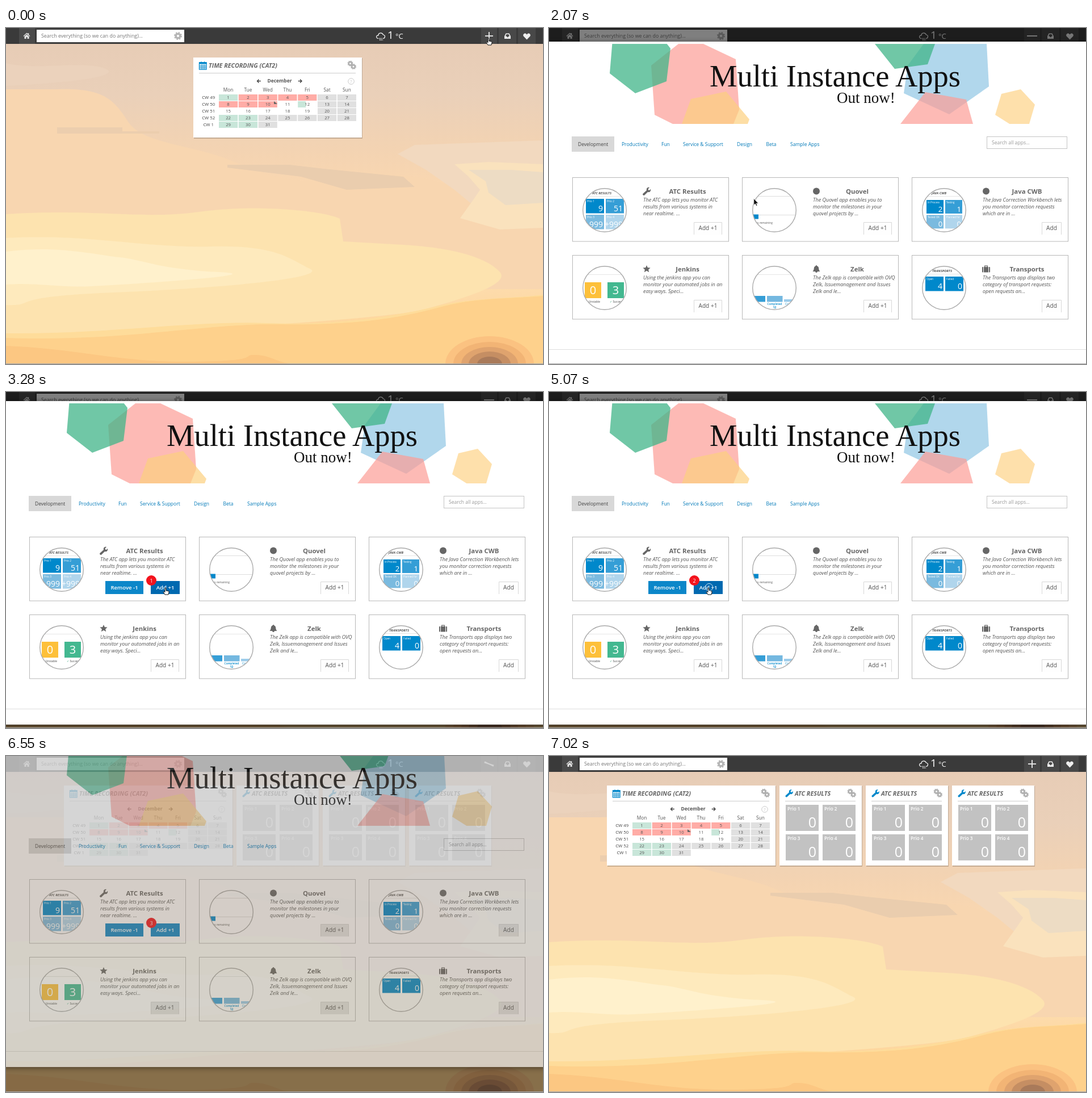
An HTML page for the animation above (8000 ms loop, 946 px wide and 592 px high).

```html
<!DOCTYPE html>
<html lang="en">
<head>
<meta charset="utf-8">
<title>App store</title>
<style>
html, body { margin: 0; width: 100%; height: 100%; overflow: hidden; background: #fbd9ae }
svg { display: block; width: 100%; height: 100%; font-family: "Open Sans", sans-serif }
.b { font-weight: 700 }
.s { font-weight: 600 }
.i { font-style: italic }
.m { text-anchor: middle }
.e { text-anchor: end }
.serif { font-family: "Liberation Serif", serif }
.btn { fill: #fefefe; stroke: #d8d8d8 }
.fading .btn { fill: #e6e6e6; stroke: #d4d4d4 }
</style>
</head>
<body>
<svg id="stage" viewBox="0 0 946 592" preserveAspectRatio="none"></svg>
<script>
const LOOP = 8000, BLUE = '#0088cb', GREY = '#666';
const $ = id => document.getElementById(id);

// Drawing helpers
const text = (x, y, size, str, fill = GREY, cls = '') =>
  `<text x="${x}" y="${y}" font-size="${size}" fill="${fill}" class="${cls}">${str}</text>`;
const rect = (x, y, w, h, fill, more = '') =>
  `<rect x="${x}" y="${y}" width="${w}" height="${h}" fill="${fill}" ${more}/>`;
const path = (d, fill, more = '') => `<path d="${d}" fill="${fill}" ${more}/>`;
const poly = (points, fill, opacity = 1) =>
  `<polygon points="${points}" fill="${fill}" opacity="${opacity}"/>`;
const line = (x1, x2, y, stroke = '#ccc') => path(`M${x1} ${y}H${x2}`, 'none', `stroke="${stroke}"`);
const circle = (x, y, r, fill, more = '') => `<circle cx="${x}" cy="${y}" r="${r}" fill="${fill}" ${more}/>`;
const group = (x, y, body, scale = 1) => `<g transform="translate(${x} ${y}) scale(${scale})">${body}</g>`;
const icon = (x, y, d, fill, scale = 1) => group(x, y, path(d, fill), scale);

const WRENCH = 'M-6.6 4.6 0-1.6C-1-5 2-7.4 5-6.4L2.6-4 3-2 5-1.6 7-3.8C8 .2 5 2.4 2 1.6L-4 7.2C-6 8-7.6 6.4-6.6 4.6Z';
const STAR = 'M0-6.6 1.9-2.2 6.6-1.9 3.1 1.2 4.2 5.8 0 3.3-4.2 5.8-3.1 1.2-6.6-1.9-1.9-2.2Z';
const BELL = 'M-6.5 4.5C-4 2-4.5-1-3.8-3-3-5-1.2-5.3-1-5.6A1 1 0 0 1 1-5.6C1.2-5.3 3-5 3.8-3 4.5-1 4 2 6.5 4.5H2A2 2 0 0 1-2 4.5Z';
const CASE = 'M-5-3.5V6H-6A1 1 0 0 1-7 5V-2.5A1 1 0 0 1-6-3.5ZM5-3.5H6A1 1 0 0 1 7-2.5V5A1 1 0 0 1 6 6H5ZM-4 6V-3.5H-3V-6H3V-3.5H4V6ZM-1.8-3.5H1.8V-4.8H-1.8Z';
const DOT = 'M-6 0A6 6 0 1 1 6 0A6 6 0 1 1-6 0Z';
const HEART = 'M0 6-5.8 0C-8-4-2.6-7.5 0-3 2.6-7.5 8-4 5.8 0Z';
const ARROW = 'M-3.5 0 0-3.5 1-2.5-.8-.7H3.8V.7H-.8L1 2.5 0 3.5Z';

const gear = (x, y, r, color) =>
  circle(x, y, r * .55, 'none', `stroke="${color}" stroke-width="${r * .5}"`) +
  circle(x, y, r * .86, 'none', `stroke="${color}" stroke-width="${r * .3}" stroke-dasharray="${r * .3377}"`);
const gears = (x, y) => gear(x - 2.5, y - 2.5, 5, '#b0b0b0') + gear(x + 3, y + 3, 5, '#b0b0b0');

function sky() {
  const stops = [[0, '#e6cbb5'], [.2, '#ead0b9'], [.36, '#f3d3b2'], [.5, '#fbd8b0'], [.75, '#fddcae'], [1, '#fed28f']];
  const mound = [[78, 49, '#fbc281'], [64, 39, '#f2b475'], [50, 30, '#dfa36e'], [37, 22, '#c58e63'], [22, 13, '#a97a5a']];
  return `<linearGradient id="sky" x2="0" y2="1">${stops.map(([o, c]) => `<stop offset="${o}" stop-color="${c}"/>`).join('')}</linearGradient>` +
    rect(0, 0, 946, 592, 'url(#sky)') +
    path('M0 108H90C170 105 190 125 215 165S330 205 400 235 520 280 640 262 830 310 946 330V460H0Z', '#f8d6b0') +
    path('M0 62C50 75 130 58 170 70S140 95 0 102Z', '#ebd2bc') +
    path('M90 175H205V182H270V186H90Z', '#ecceae') +
    path('M390 241H500L560 248 700 262 720 280 600 285 520 262 390 246Z', '#eacdae') +
    path('M690 222 720 206 946 198V350L830 318 790 285 740 250Z', '#f2d9bf') +
    path('M790 240 850 236 946 240V352L870 355 800 335 825 300 835 285 815 262Z', '#fae2bd') +
    path('M815 250H890L946 254V308L880 312 850 290 845 270Z', '#eddcc4') +
    path('M0 328C160 318 240 338 340 324S560 322 588 336L594 376 700 382C800 388 850 408 870 430S800 478 740 495 380 530 0 548Z', '#fde3af') +
    path('M0 370C150 362 240 388 360 385S500 408 535 424 390 458 190 466 60 490 0 488Z', '#feeabd') +
    path('M0 394C90 382 160 400 200 404S270 425 375 430 210 452 150 455 60 448 0 452Z', '#fff1cc') +
    path('M0 538C180 540 330 515 460 520S700 505 760 490 880 478 946 470V592H0Z', '#fedc9a') +
    path('M0 546C210 553 350 520 480 522S690 512 760 493 880 478 946 472V592H0Z', '#fed18c') +
    path('M0 560C130 565 200 590 330 588S410 575 440 576 480 592 510 592H0Z', '#fcc782') +
    mound.map(([rx, ry, c]) => `<ellipse cx="852" cy="592" rx="${rx}" ry="${ry}" fill="${c}"/>`).join('');
}

function header() {
  const bar = id => rect(-7, -.9, 14, 1.8, '#eee', `id="${id}"`);
  return rect(0, 0, 946, 28, '#3a3a3a') + rect(23, 0, 28, 28, '#4a4a4a') +
    path('M30.5 14 36.5 8.5 38.5 10.3V9H40.2V12L42.5 14 41.7 15 36.5 10.3 31.4 15ZM32.5 15 36.5 11.5 40.6 15V19H37.6V16H35.5V19H32.5Z', '#e4e4e4') +
    rect(54, 3, 260, 22, '#fff') + text(62, 17, 8.8, 'Search everything (so we can do anything)...', '#777') +
    gear(303, 14, 7, '#b5b5b5') +
    path('M656 18.5C651 18 652 12.5 656 13 656 8 663 7.5 664.5 12 669 12.5 668 18.5 664 18.5', 'none', 'stroke="#fff" stroke-width="1.2"') +
    path('M657 18.5H663M658 21H664', 'none', 'stroke="#fff" stroke-width="1.4" stroke-dasharray="1.4 1.2"') +
    text(672, 19, 19, '1', '#fff') + text(686, 19, 13, '°C', '#fff') +
    rect(837, 0, 28, 28, '#484848') + rect(868, 0, 31, 28, '#484848') + rect(902, 0, 31, 28, '#484848') +
    group(851, 14, bar('barA') + bar('barB')) +
    path('M880.5 9.5H886.5L889 14.5V19H878V14.5ZM881.5 11 880 14.5H882L883 16.3H884.5L885.3 14.5H887L885.5 11Z', '#eee', 'fill-rule="evenodd"') +
    icon(917.5, 14.5, HEART, '#eee');
}

const panel = w => rect(1, 53, w, 142, '#000', 'opacity=".18"') + rect(0, 52, w, 141, '#fff') +
  gears(w - 18, 65) + line(10, w - 11, 79.5);

function calendar() {
  const tones = { g: '#c8e6d9', r: '#ffaca6', y: '#e0e0e0' };
  const rows = ['grrrryy', 'rrrwwyy', 'wwwwwyy', 'ggyyyyy', 'ggy'];
  const weeks = [49, 50, 51, 52, 1];
  const col = i => 45 + i * 34.8;
  const days = rows.map((row, r) => text(26.7, 125 + r * 12, 7.8, 'CW ' + weeks[r], '#444', 'm') +
    [...row].map((k, c) => (tones[k] ? rect(col(c), 117 + r * 12, 33.2, 11, tones[k]) : '') +
      (r === 1 && c === 4 ? rect(col(c), 129, 14, 11, tones.g) : '') +
      text(col(c) + 16.6, 125 + r * 12, 7.8, r * 7 + c + 1, '#555', 'm')).join('')).join('');
  return panel(297) +
    rect(10.5, 61, 12.5, 12, '#fff', `stroke="${BLUE}" stroke-width="1.3"`) + rect(10, 60, 13.5, 3.5, BLUE) +
    path('M14 59V62M19.5 59V62M14 64V73M17 64V73M20 64V73M10 67H23M10 70H23', 'none', `stroke="${BLUE}"`) +
    text(27, 70, 10.75, 'TIME RECORDING (CAT2)', GREY, 'b i') +
    icon(115, 93.5, ARROW, '#444') + text(152, 96, 8.45, 'December', '#555', 'b m') + icon(188.5, 93.5, ARROW, '#444', '-1 1') +
    circle(278, 94, 5.3, 'none', 'stroke="#ccc"') + text(278, 97, 8, '?', '#c4c4c4', 'm') +
    ['Mon', 'Tue', 'Wed', 'Thu', 'Fri', 'Sat', 'Sun'].map((d, i) => text(col(i) + 16.6, 112, 8.3, d, '#555', 'm')).join('') +
    days + path('M142 129 148 134H142Z', '#666');
}

const results = x => group(x, 0, panel(145) + icon(17, 65.5, WRENCH, BLUE, .95) +
  text(27, 70, 10.75, 'ATC RESULTS', GREY, 'b i') +
  [0, 1, 2, 3].map(i => group(11 + i % 2 * 65, 86 + (i >> 1) * 52, rect(0, 0, 58, 46, '#c2c2c2') +
    text(3, 9.5, 8.1, 'Prio ' + (i + 1), '#fff', 's') + text(54, 40, 25, 0, '#fff', 'e'))).join(''));

// Miniatures inside the round previews
const TONES = [BLUE, '#359ed6', '#7abadf', '#b0d5ec'];
const tiles = (x, y, list, scale = 1, tones = TONES) => group(x, y, list.map(([label, n], i) =>
  group(i % 2 * 35, (i >> 1) * 28, rect(0, 0, 32, 25.5, tones[i]) +
    text(2, 6, 4.8, label, '#fff') + text(30, 22, 14, n, '#fff', 'e'))).join(''), scale);
const mini = (x, str) => text(x, 29, 5.8, str, '#555', 'b i e') + line(18, 96, 32.5, '#e6e6e6');

const APPS = [
  { name: 'ATC Results', icon: WRENCH, lines: ['The ATC app lets you monitor ATC', 'results from various systems in', 'near realtime. ...'],
    art: mini(69, 'ATC RESULTS') + tiles(24, 37, [['Prio 1', 9], ['Prio 2', 51], ['Prio 3', '999'], ['Prio 4', '+999']]) },
  { name: 'Quovel', icon: DOT, lines: ['The Quovel app enables you to', 'monitor the milestones in your', 'quovel projects by ...'],
    art: line(18, 96, 32.5, '#ddd') + line(18, 96, 65.5, '#ddd') + rect(18, 64.5, 11, 8, BLUE) + text(54, 81, 4.9, 'days remaining', '#555', 'e') },
  { name: 'Java CWB', icon: DOT, single: true, lines: ['The Java Correction Workbench lets', 'you monitor correction requests', 'which are in ...'],
    art: mini(61, 'JAVA CWB') + tiles(26, 39, [['In Process', 2], ['Testing', 1], ['Tested OK', 0], ['Planned for', 0]], .94) },
  { name: 'Jenkins', icon: STAR, lines: ['Using the jenkins app you can', 'monitor your automated jobs in an', 'easy ways. Speci...'],
    art: line(18, 96, 33.5, '#e6e6e6') + rect(22, 47, 29, 28, '#fdc03a') + rect(62, 47, 29, 28, '#43b890') +
      text(36.5, 68, 20, 0, '#fff', 'm') + text(76.5, 68, 20, 3, '#fff', 'm') +
      text(49, 83, 4.9, 'Unstable', '#444', 'e') + text(66, 83, 4.9, '<tspan fill="#2a9d70">✓</tspan> Success', '#444') },
  { name: 'Zelk', icon: BELL, lines: ['The Zelk app is compatible with OVQ', 'Zelk, Issuemanagement and Issues', 'Zelk and le...'],
    art: line(18, 96, 33.5, '#e6e6e6') + rect(18, 71, 23, 10.5, TONES[1]) + rect(44, 71, 27.5, 10.5, '#74b8e0') + rect(74, 77, 20, 4.5, '#9cccea') +
      text(57.5, 86.5, 4.9, 'Completed', BLUE, 's m') + text(57.5, 93, 4.9, 12, BLUE, 'b m') + text(76, 86.5, 4.9, 'Confirmed', BLUE) },
  { name: 'Transports', icon: CASE, single: true, lines: ['The Transports app displays two', 'category of transport requests:', 'open requests an...'],
    art: mini(71, 'TRANSPORTS') + tiles(24, 37, [['Open', 4], ['Failed', 0]], 1, [BLUE, BLUE]) }
];

function card(app, i) {
  const w = app.single ? 35 : 50, x = 264 - w;
  return group(41 + i % 3 * 299, i < 3 ? 256 : 393,
    rect(.5, -.5, 275, 112.5, 'none', 'stroke="#b8b8b8"') +
    `<g clip-path="url(#lens)">${app.art}</g>` + circle(57, 57, 38.3, 'none', 'stroke="#aaa" stroke-width="1.4"') +
    icon(131, 23.5, app.icon, GREY) + text(203, 28, 11.4, app.name, GREY, 'b m') +
    app.lines.map((l, k) => text(125, 42 + k * 12, 9, l, '#555', 'i')).join('') +
    `<path class="btn" d="M${x + .5} 100V78.5H${x + w - .5}V100"/>` +
    text(x + w / 2, 92, 10.1, app.single ? 'Add' : 'Add +1', '#555', 'm') +
    (i ? '' : `<g id="added">${rect(134, 77, 67, 23, '#0c87c9')}${text(167.5, 92, 9.6, 'Remove -1', '#fff', 's m')}` +
      rect(214, 77, 51, 23, '#0c87c9', 'id="add"') + text(239.5, 92, 9.6, 'Add +1', '#fff', 's m') +
      circle(215, 76, 9, '#f3131d') + '<text id="count" x="215" y="79.5" font-size="9" fill="#fff" class="m"></text></g>'));
}

function modal() {
  const tabs = [[51, 'Development'], [128, 'Productivity'], [198, 'Fun'], [236, 'Service &amp; Support'], [331, 'Design'], [382.5, 'Beta'], [425, 'Sample Apps']];
  return rect(-10, 16, 966, 570, '#fff', 'style="filter:drop-shadow(0 2px 5px rgba(0,0,0,.65))"') +
    '<g clip-path="url(#banner)">' +
    poly('228,20 272,20 329,47 335,136 325,161 218,161 186,145 180,58', '#fc9d96', .7) +
    poly('250,117 312,104 353,153 350,161 234,161', '#fdd07f', .7) +
    poly('112,12 107,72 152,107 207,86 214,28 200,10', '#40b489', .75) +
    poly('660,20 771,20 775,95 705,144 625,107 632,58', '#90c6e4', .7) +
    poly('574,20 609,64 667,56 680,20', '#40b489', .75) +
    poly('619,161 663,105 735,118 747,161', '#fc9d96', .7) +
    poly('786,145 797,108 831,100 856,127 846,161 824,169', '#fdd07f', .65) + '</g>' +
    text(283, 95, 54.5, 'Multi Instance Apps', '#111', 'serif') + text(507, 124, 27, 'Out now!', '#111', 'serif') +
    rect(40, 183, 75, 27, '#d8d8d8') +
    tabs.map(([x, s], i) => text(x, 199.5, 8.5, s, i ? '#0079b8' : '#444')).join('') +
    rect(771.5, 183.5, 141, 21, '#fff', 'stroke="#c4c4c4"') + text(780, 197, 8.6, 'Search all apps...', '#999') +
    APPS.map(card).join('') + line(0, 946, 558.5, '#ddd');
}

$('stage').innerHTML =
  `<clipPath id="lens">${circle(57, 57, 38, '#000')}</clipPath><clipPath id="banner">${rect(0, 20, 946, 141, '#000')}</clipPath>` +
  sky() + header() + `<g id="calendar">${calendar()}</g><g id="results">${[406, 558, 710].map(results).join('')}</g>` +
  rect(0, 0, 946, 592, '#000', 'id="shade"') + `<g id="modal">${modal()}</g>` +
  '<g id="pointer">' +
  path('M0 0V11.5L2.6 9.2 4.4 13 6.2 12.2 4.5 8.5H8Z', '#111', 'id="arrow" stroke="#fff" stroke-width=".7"') +
  path('M-1 1C-1-.5 1-.5 1 1V5L5 5.7Q6.5 6 6 8L5 12H-1L-3.6 8C-4 6.5-2.5 6.3-1 7.8Z', '#fff', 'id="hand" stroke="#111"') +
  circle(1, -1, 6.5, 'none', 'id="ring" stroke="#cfe3f2"') + '</g>' +
  rect(0, 591, 946, 1, '#aaa');

// Number of steps reached out of n, the first at t0 and the last at t1
const steps = (t, t0, t1, n) => Math.max(0, Math.min(n, Math.floor((t - t0 + 6) * (n - 1) / (t1 - t0)) + 1));
const easeOut = p => 1 - (1 - p) ** 2;
const mix = (a, b, p) => a + (b - a) * p;
const show = (id, on) => $(id).setAttribute('display', on ? 'inline' : 'none');
const set = (id, name, value) => $(id).setAttribute(name, value);

// Modal poses: [modal opacity, vertical shift, shade opacity, plus-to-minus progress]
const OPENING = [[0, 0, 0, 0], [0, 0, .3, .3], [.88, -55, .45, .8], [1, 8, .5, 1]];
const CLOSING = [[1, 0, .5, 1], [.95, -6, .5, .97], [.65, -38, .47, .9], [.2, -90, .45, .6], [0, 0, .25, .2], [0, 0, 0, 0]];

function draw(t) {
  const open = steps(t, 890, 1180, 3), travel = steps(t, 1480, 2510, 8), first = steps(t, 2650, 3280, 5);
  const leave = steps(t, 5070, 6100, 8), close = steps(t, 6400, 7020, 5);

  let [alpha, dy, dark, turn] = close ? CLOSING[close] : OPENING[open];
  if (first && !close) dy = 10 - 2 * first;
  set('modal', 'opacity', alpha);
  set('modal', 'transform', `translate(0 ${dy})`);
  set('modal', 'class', alpha < 1 ? 'fading' : '');
  set('shade', 'opacity', dark);
  const size = mix(1, 1.28, turn);
  set('barA', 'transform', `rotate(${-180 * turn}) scale(${size} 1)`);
  set('barB', 'transform', `rotate(${90 - 270 * turn}) scale(${size} 1)`);

  show('results', close);
  set('calendar', 'transform', `translate(${close ? 102 : 330} 0)`);

  show('added', first > 1);
  $('count').textContent = leave > 1 ? 3 : t >= 4320 ? 2 : 1;
  set('add', 'fill', leave > 2 ? '#0c87c9' : '#0069b0');

  let x = 850, y = 18;
  if (open) {
    const p = easeOut(travel / 8);
    x = mix(848, 281, p);
    y = mix(16, 347, p);
  }
  if (first) y = 345 + dy / 4;
  if (leave > 2) {
    const p = easeOut((leave - 2) / 6);
    x = mix(281, 940, p);
    y = mix(345, 367, p);
  }
  const hand = !open || (travel === 8 && leave < 3);
  show('pointer', leave < 8);
  set('pointer', 'transform', `translate(${x} ${y})`);
  show('hand', hand);
  show('arrow', !hand);
  show('ring', (t >= 450 && t < 590) || first === 1 || (t >= 4180 && t < 4320) || leave === 1);
}

const start = performance.now();
(function tick() {
  draw((performance.now() - start) % LOOP);
  requestAnimationFrame(tick);
})();
</script>
</body>
</html>
```
